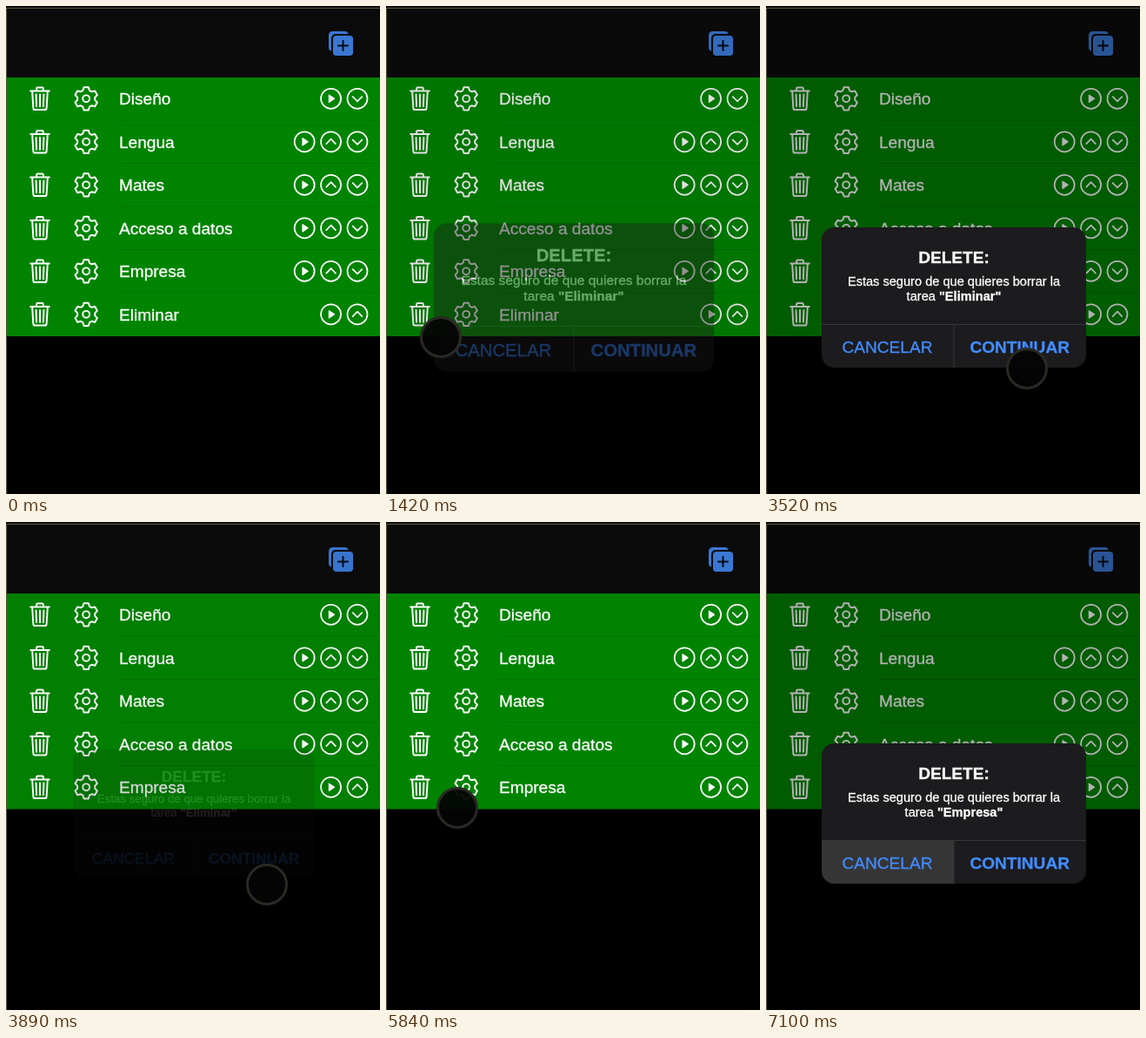
Animation of 430 by 560 pixels, one loop 7.15 s. Source, as an HTML page:

```html
<!DOCTYPE html>
<html lang="es">
<head>
<meta charset="utf-8">
<title>Tareas</title>
<style>
  html, body { margin: 0; width: 100%; height: 100%; overflow: hidden; background: #000; }
  svg { display: block; width: 430px; height: 560px; }
  text { font: 19.1px "Liberation Sans", Arial, sans-serif; stroke: currentColor; stroke-width: .3px; }
  .bold { font-weight: bold; }
  .small { font-size: 14.6px; }
  .white { fill: #fff; color: #fff; }
  .blue { fill: #428cff; color: #428cff; }
  .icon { fill: none; stroke: #fff; stroke-width: 32; stroke-linecap: round; stroke-linejoin: round; }
</style>
</head>
<body>
<svg viewBox="0 0 430 560">
  <defs>
    <g id="trash" class="icon">
      <path d="M-144-144l20 320c1 18 14 32 32 32H92c18 0 31-14 32-32l20-320M-176-144H176M-64-144v-40a24 24 0 0 1 24-24h80a24 24 0 0 1 24 24v40M0-80v224M-72-80l8 224M72-80l-8 224"/>
    </g>
    <g id="gear" class="icon"><path id="cog"/><circle r="64"/></g>
    <g id="play" class="icon"><circle r="208"/><path d="M-40-74L72 0-40 74z" fill="#fff" stroke-width="22"/></g>
    <g id="up" class="icon"><circle r="208"/><path d="M-96 40L0-56 96 40"/></g>
    <g id="down" class="icon"><circle r="208"/><path d="M-96-40L0 56 96-40"/></g>
  </defs>

  <rect width="430" height="560"/>
  <rect width="430" height="82" fill="#0b0b0c"/>
  <g transform="translate(369 27) scale(.0625)" fill="#3a78d4">
    <path d="M396 80A72 72 0 0 0 328 32H104a72 72 0 0 0-72 72v224a72 72 0 0 0 48 68V160a80 80 0 0 1 80-80z"/>
    <rect x="112" y="112" width="368" height="368" rx="60"/>
    <path d="M296 208v176M208 296h176" stroke="#060a10" stroke-width="32" stroke-linecap="round"/>
  </g>
  <g id="before"></g>
  <g id="after"></g>

  <rect id="backdrop" width="430" height="560"/>
  <path d="M0 2.5H430M.5 2V560" stroke="#58583c" fill="none"/>

  <g id="dialog" text-anchor="middle">
    <clipPath id="card"><rect x="64" y="254" width="304" height="161" rx="14.6"/></clipPath>
    <g clip-path="url(#card)">
      <rect x="64" y="254" width="304" height="161" fill="#1c1b1d"/>
      <rect id="pressed" x="64" y="365" width="152" height="50" fill="#363536"/>
      <path d="M64 365.5H368M216 365V415" stroke="#373638" fill="none"/>
    </g>
    <g class="white">
      <text class="bold" x="216" y="295">DELETE:</text>
      <text class="small" x="216" y="320.5">Estas seguro de que quieres borrar la</text>
      <text class="small" x="216" y="338">tarea <tspan id="task" class="bold"></tspan></text>
    </g>
    <g class="blue">
      <text x="139.5" y="398">CANCELAR</text>
      <text class="bold" x="291.7" y="398">CONTINUAR</text>
    </g>
  </g>

  <circle id="cursor" r="22.5" fill="#050505" fill-opacity=".95" stroke="#2b2924" stroke-width="3"/>
</svg>
<script>
const LOOP = 7150, FADE = 200, ROW = 49.5, TOP = 82;
const OPEN_1 = 1335, CLOSE = 3735, OPEN_2 = 6360, PRESS = 7000;
const tasks = ['Diseño', 'Lengua', 'Mates', 'Acceso a datos', 'Empresa', 'Eliminar'];
const $ = id => document.getElementById(id);

// Pointer stops: time, x, y
const path = [
  [470, 150, 590], [1160, 63, 380], [1560, 63, 380], [1800, -30, 330],
  [2440, -30, 215], [2680, 121, 217], [3050, 316, 330], [3370, 300, 416],
  [4160, 300, 416], [4420, 82, 328], [5840, 82, 328], [6120, 63, 330],
  [6420, 63, 330], [6680, -30, 320]
];

function cogPath() {
  const points = [];
  for (let k = 0; k < 6; k++) {
    for (const [angle, r] of [[-22, 165], [-11.4, 218], [11.4, 218], [22, 165]]) {
      const a = (k * 60 + angle) * Math.PI / 180;
      points.push((r * Math.sin(a)).toFixed(1) + ' ' + (-r * Math.cos(a)).toFixed(1));
    }
  }
  return 'M' + points.join('L') + 'z';
}

const icon = (id, x, y, scale) =>
  `<use href="#${id}" transform="translate(${x} ${y}) scale(${scale})"/>`;

function list(names) {
  const rows = names.map((name, i) => {
    const y = TOP + ROW * i + 24.3, last = i === names.length - 1;
    const buttons = ['play', i > 0 && 'up', !last && 'down'].filter(Boolean).reverse();
    return icon('trash', 39, y, .0615) + icon('gear', 92.2, y, .0615) +
      `<text class="white" x="130" y="${y + 6.7}">${name}</text>` +
      buttons.map((b, n) => icon(b, 404 - 30.4 * n, y, .0552)).join('') +
      (last ? '' : `<path d="M129 ${TOP + ROW * (i + 1) - .5}H430" stroke="#007400"/>`);
  });
  return `<rect x="1" y="${TOP}" width="429" height="${ROW * names.length}" fill="#008400"/>` + rows.join('');
}

const clamp = v => Math.max(0, Math.min(1, v));
const smooth = v => v * v * (3 - 2 * v);
const progress = (t, start) => smooth(clamp((t - start) / FADE));

function pointer(t) {
  let i = path.findIndex(p => p[0] > t);
  if (i < 0) i = path.length - 1;
  if (i === 0) i = 1;
  const [t0, x0, y0] = path[i - 1], [t1, x1, y1] = path[i];
  const k = smooth(clamp((t - t0) / (t1 - t0)));
  return [x0 + (x1 - x0) * k, y0 + (y1 - y0) * k];
}

function draw(t) {
  const second = t >= OPEN_2, closing = t >= CLOSE && !second;
  const k = closing ? 1 - progress(t, CLOSE) : progress(t, second ? OPEN_2 : OPEN_1);
  const scale = closing ? .9 + .1 * k : 1.1 - .1 * k;
  const removed = t >= CLOSE;

  $('before').style.display = removed ? 'none' : '';
  $('after').style.display = removed ? '' : 'none';
  $('backdrop').setAttribute('opacity', .3 * k);
  $('dialog').setAttribute('opacity', k);
  $('dialog').setAttribute('transform', `translate(216 334.5) scale(${scale}) translate(-216 -334.5)`);
  $('task').textContent = `"${tasks[second ? 4 : 5]}"`;
  $('pressed').style.display = t >= PRESS ? '' : 'none';

  const [x, y] = pointer(t);
  $('cursor').setAttribute('transform', `translate(${x} ${y})`);
}

$('cog').setAttribute('d', cogPath());
$('before').innerHTML = list(tasks);
$('after').innerHTML = list(tasks.slice(0, 5));

const start = performance.now();
function frame() {
  draw((performance.now() - start) % LOOP);
  requestAnimationFrame(frame);
}
frame();
</script>
</body>
</html>
```
